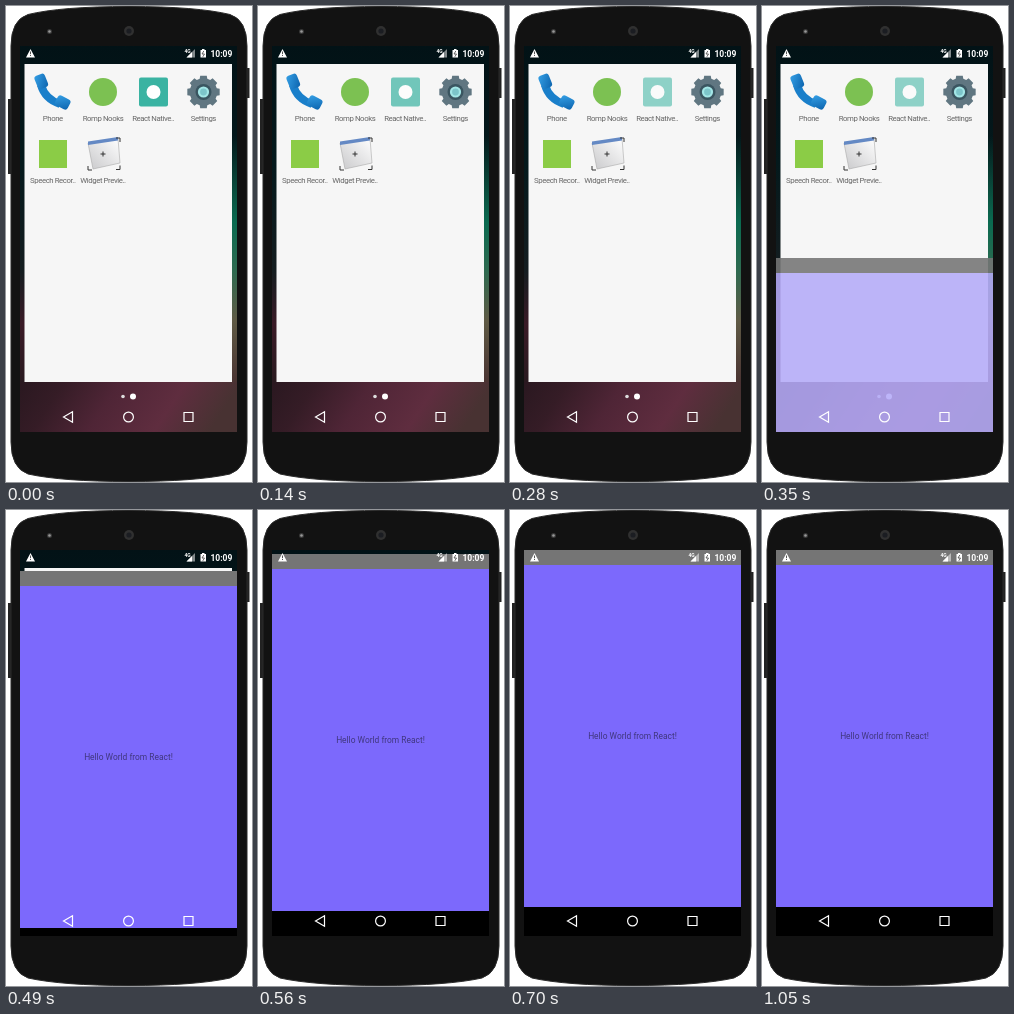
An HTML page that plays this animation: 246 by 476 pixels, repeating every 1820 ms.

```html
<!DOCTYPE html>
<html lang="en">
<head>
<meta charset="utf-8">
<title>App launch</title>
<style>
  html, body { margin: 0; width: 100%; height: 100%; overflow: hidden; background: #fff; }
  svg { display: block; width: 100%; height: 100%; }
  text { font-family: Roboto, sans-serif; }
  .label { font-size: 7.8px; letter-spacing: -.42px; fill: #666; text-anchor: middle; }
</style>
</head>
<body>
<svg viewBox="0 0 246 476">
  <defs>
    <linearGradient id="wall" x2="0" y2="1">
      <stop offset="0" stop-color="#021216"/>
      <stop offset=".3" stop-color="#04191c"/>
      <stop offset=".58" stop-color="#141d20"/>
      <stop offset=".72" stop-color="#3a1a26"/>
      <stop offset=".87" stop-color="#2a1a20"/>
    </linearGradient>
    <linearGradient id="edge" x2="0" y2="1">
      <stop offset="0" stop-color="#0a6a50" stop-opacity="0"/>
      <stop offset=".35" stop-color="#0a6a50"/>
      <stop offset=".55" stop-color="#2f6a50"/>
      <stop offset=".75" stop-color="#5f5a45"/>
      <stop offset="1" stop-color="#4a3432"/>
    </linearGradient>
    <linearGradient id="floor" y2=".15">
      <stop offset="0" stop-color="#2a1820"/>
      <stop offset=".2" stop-color="#351c26"/>
      <stop offset=".45" stop-color="#4f2536"/>
      <stop offset=".75" stop-color="#5f2d3f"/>
      <stop offset="1" stop-color="#483232"/>
    </linearGradient>
    <linearGradient id="blue" x2="1" y2="1">
      <stop offset="0" stop-color="#35a0e6"/>
      <stop offset="1" stop-color="#0c63ad"/>
    </linearGradient>
    <linearGradient id="paper" x1="1" x2="0" y2="1">
      <stop offset="0" stop-color="#fff"/>
      <stop offset="1" stop-color="#c9c9cb"/>
    </linearGradient>
    <clipPath id="screen"><path d="M14 40H231V426H14Z"/></clipPath>
  </defs>

  <!-- handset -->
  <path d="M2 93h4v75H2ZM240 62h3.500v30H240Z" fill="#222"/>
  <path d="M5 40Q5 14 22 8.500Q55 .5 123 .5T224 8.500Q241 14 241 40V436Q241 462 224 468Q190 475.500 123 475.500T22 468Q5 462 5 436Z"
    fill="#121212" stroke="#2b2b2b"/>
  <circle cx="123" cy="25" r="5" fill="#303030"/>
  <circle cx="123" cy="25" r="2.600" fill="#1b1d22"/>
  <circle cx="43.500" cy="25.500" r="2.500" fill="#3a3a3a"/>
  <circle cx="43.500" cy="25.500" r="1.300" fill="#999"/>

  <g clip-path="url(#screen)">
    <!-- launcher -->
    <path d="M14 40H231V426H14Z" fill="url(#wall)"/>
    <path d="M14 376H231V426H14Z" fill="url(#floor)"/>
    <path d="M226 130h5v246h-5Z" fill="url(#edge)"/>
    <path d="M18.500 58H226V376H18.500Z" fill="#f6f6f6"/>
    <circle cx="117" cy="390.500" r="1.800" fill="#ddd"/>
    <circle cx="127" cy="390.500" r="3" fill="#fff"/>

    <g fill="url(#blue)">
      <path d="M35 79Q39 93 54 98" fill="none" stroke="#1a7fca" stroke-width="8"/>
      <rect x="30" y="68.500" width="11" height="14" rx="3" transform="rotate(-22 35 76)"/>
      <rect x="50" y="91" width="14" height="11" rx="3" transform="rotate(28 57 96)"/>
    </g>
    <circle cx="97" cy="86" r="14" fill="#7cc152"/>
    <g id="tile">
      <rect x="133" y="71.500" width="29" height="29" rx="2" fill="#3ab3a2"/>
      <circle cx="147.500" cy="86" r="7" fill="#fff"/>
    </g>
    <g transform="translate(197.500 86)">
      <path id="gear" fill="#607681"/>
      <circle r="8" fill="#3a5560"/>
      <circle r="5.600" fill="#a3e6e6"/>
      <circle r="3.400" fill="#7cc5ca"/>
    </g>
    <rect x="33" y="134" width="28" height="28" fill="#8bcc46"/>
    <path d="M82 137 112 132.500 114 157 87 163Z" fill="url(#paper)" stroke="#aaa" stroke-width=".6"/>
    <path d="M82 135.500 112 131V134.500L82 139Z" fill="#6489c4"/>
    <path d="M82 160v4h4M110 163.500h4v-4M110 132h4v4" fill="none" stroke="#333"/>
    <path d="M97 145.500v5M94.500 148h5" stroke="#333"/>
    <g id="labels"></g>

    <!-- opening app -->
    <g id="app">
      <path d="M14 40H231V426H14Z" fill="#f8f8f8"/>
      <g id="content">
        <path d="M14 54H231V397H14Z" fill="#7c69fc"/>
        <path d="M14 397H231V426H14Z"/>
        <text x="122.500" y="229" font-size="8.420" text-anchor="middle" fill="#40377f">Hello World from React!</text>
      </g>
      <path d="M14 40H231V55H14Z" fill="#757575"/>
    </g>

    <!-- system bars -->
    <g fill="#fff">
      <path d="M24.500 43 29 51.500H20Z"/>
      <path d="M24.500 45.500v2.700M24.500 49v1" stroke="#444" stroke-width=".9"/>
      <text x="178.500" y="46.500" font-size="5" font-weight="700">4G</text>
      <path d="M189 43V51.500H180.500Z" fill-opacity=".5"/>
      <path d="M186 46V51.500H180.500Z"/>
      <path d="M194.500 44h1.500v-1h2.500v1H200V51.500H194.500Z"/>
      <path d="M197.800 45 196 48h2.500l-1.700 2.800" fill="none" stroke="#444" stroke-width=".8"/>
      <text x="226.300" y="50.600" font-size="8.500" font-weight="700" text-anchor="end">10:09</text>
    </g>
    <g fill="none" stroke="#fff" stroke-width="1.200">
      <path d="M57.500 411 66.500 405.800V416.200Z"/>
      <circle cx="122.500" cy="411" r="4.900"/>
      <path d="M178 406.500h9v9h-9Z"/>
    </g>
  </g>
</svg>
<script>
const LOOP = 1820, STEP = 70;
const OPEN_AT = 302, OPEN_TIME = 426, SCREEN_H = 386;
const $ = id => document.getElementById(id);
const clamp = v => Math.min(1, Math.max(0, v));

const names = ['Phone', 'Romp Nooks', 'React Native..', 'Settings', 'Speech Recor..', 'Widget Previe..'];
$('labels').innerHTML = names.map((name, i) =>
  `<text class="label" x="${46.800 + i % 4 * 50.2}" y="${i < 4 ? 114.800 : 176.800}">${name}</text>`).join('');

// Eight teeth, four corners each
$('gear').setAttribute('d', 'M' + Array.from({ length: 32 }, (_, i) => {
  const tooth = i >> 2, corner = i % 4;
  const angle = tooth * Math.PI / 4 + [-.28, -.2, .2, .28][corner];
  const r = corner % 3 ? 16.5 : 13.8;
  return `${r * Math.cos(angle)} ${r * Math.sin(angle)}`;
}).join('L') + 'Z');

function draw(t) {
  t = Math.floor(t / STEP) * STEP;
  $('tile').setAttribute('opacity', 1 - .45 * clamp(t / 210));

  // Quintic deceleration from the bottom of the screen
  const left = 1 - clamp((t - OPEN_AT) / OPEN_TIME);
  $('app').setAttribute('transform', `translate(0 ${Math.round(SCREEN_H * left ** 5)})`);
  $('app').setAttribute('opacity', clamp(.88 + (t - 350) / 580));
  $('app').setAttribute('display', t < OPEN_AT ? 'none' : 'inline');
  $('content').setAttribute('opacity', clamp(.53 + (t - 350) / 190));
}

function frame(now) {
  draw(now % LOOP);
  requestAnimationFrame(frame);
}
draw(0);
requestAnimationFrame(frame);
</script>
</body>
</html>
```
